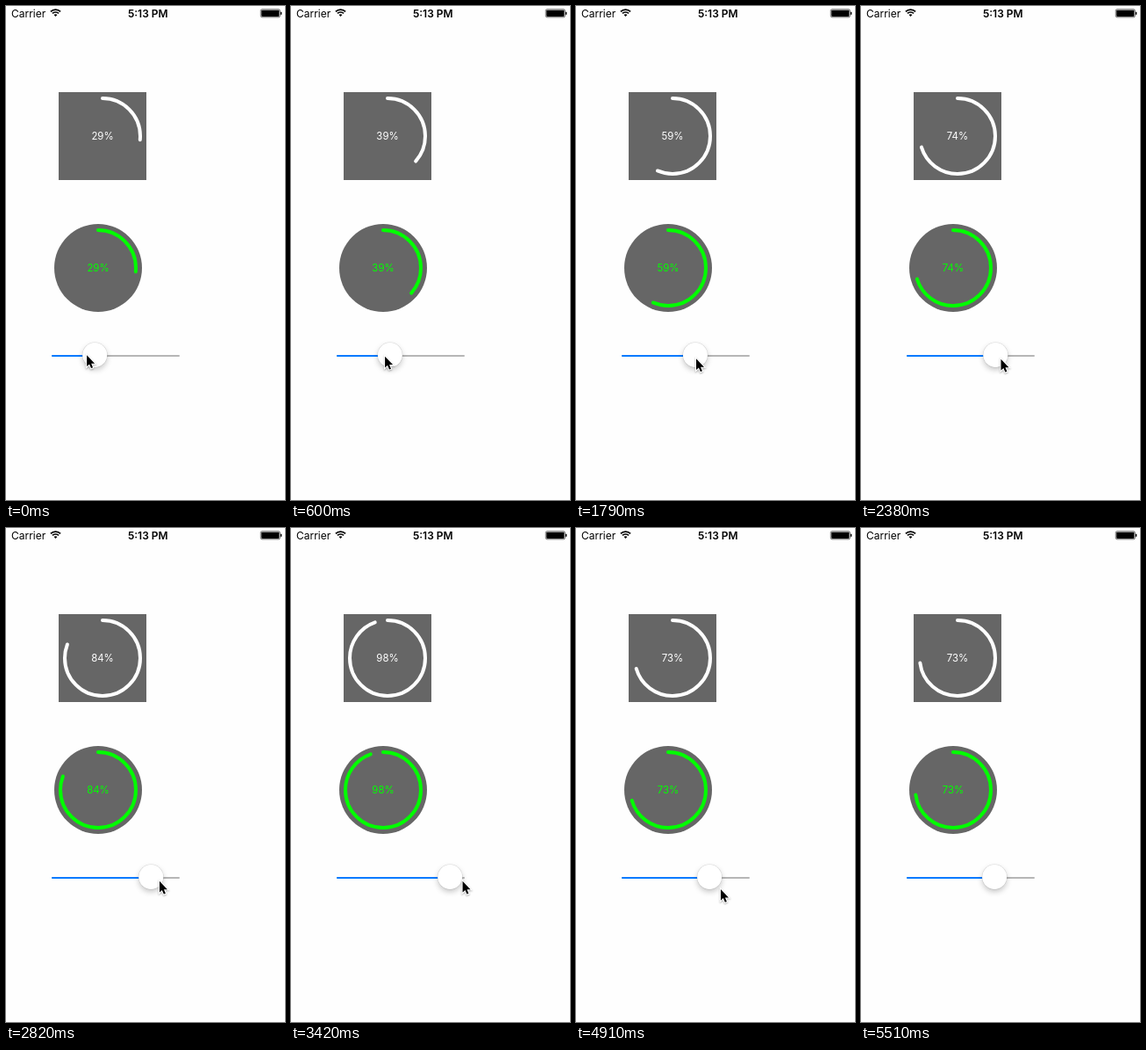
Write an HTML page with a canvas that moves like this. It is 318x562 px and loops after 5830 ms.

```html
<!DOCTYPE html>
<html lang="en">
<head>
<meta charset="utf-8">
<title>Progress rings</title>
<style>
html, body { margin: 0; width: 100%; height: 100%; overflow: hidden; background: #fefefe; }
canvas { display: block; width: 318px; height: 562px; }
</style>
</head>
<body>
<canvas id="stage"></canvas>
<script>
const W = 318, H = 562, LOOP = 5830, STEP = 148.2, LAST_STEP = 37;
const TOP = -Math.PI / 2;
const canvas = document.getElementById('stage');
const ctx = canvas.getContext('2d');
const ratio = window.devicePixelRatio || 1;
canvas.width = W * ratio;
canvas.height = H * ratio;
ctx.scale(ratio, ratio);

// Turning points of the drag: [step, percent].
const drag = [[-1, 26.6], [12, 59], [16, 74], [24, 101.5], [26, 100], [29, 77], [31, 68], [33, 73]];

function percentAt(step) {
  const next = drag.findIndex(([at]) => at >= step);
  if (next < 0) return drag[drag.length - 1][1];
  if (next === 0) return drag[0][1];
  const [t0, p0] = drag[next - 1], [t1, p1] = drag[next];
  return Math.min(100, p0 + (p1 - p0) * (step - t0) / (t1 - t0));
}

// The pointer runs a little faster than the knob, then flicks off the stage.
function pointerAt(step, percent) {
  const flick = Math.max(0, step - 31) ** 3;
  return [
    91 + 1.5 * (percent - 29) + 0.87 * flick,
    396 + Math.min(4.5, step / 3) + 1.15 * flick
  ];
}

function disc(x, y, r, color) {
  ctx.fillStyle = color;
  ctx.beginPath();
  ctx.arc(x, y, r, 0, Math.PI * 2);
  ctx.fill();
}

function arc(x, y, r, from, to, width, color, cap) {
  ctx.strokeStyle = color;
  ctx.lineWidth = width;
  ctx.lineCap = cap;
  ctx.beginPath();
  ctx.arc(x, y, r, from, to);
  ctx.stroke();
}

function line(x1, x2, y, color) {
  ctx.strokeStyle = color;
  ctx.lineWidth = 2;
  ctx.lineCap = 'round';
  ctx.beginPath();
  ctx.moveTo(x1, y);
  ctx.lineTo(x2, y);
  ctx.stroke();
}

function text(str, x, y, color, align, size = 12, weight = 400) {
  ctx.font = `${weight} ${size}px Inter, Roboto, sans-serif`;
  ctx.textAlign = align;
  ctx.fillStyle = color;
  ctx.fillText(str, x, y);
}

function statusBar() {
  text('Carrier', 6, 12.5, '#000', 'left');
  text('5:13 PM', 161.8, 12.5, '#000', 'center', 12, 600);

  const spread = Math.PI / 4;
  for (const [r, width] of [[1.4, 2.8], [5, 1.7], [7.9, 1.7]]) {
    arc(56.5, 12, r, TOP - spread, TOP + spread, width, '#000', 'butt');
  }

  ctx.fillStyle = '#000';
  ctx.lineWidth = 0.6;
  ctx.beginPath();
  ctx.roundRect(290.3, 3.8, 22, 9, 1.6);
  ctx.stroke();
  ctx.beginPath();
  ctx.roundRect(291.2, 4.7, 20.2, 7.2, 0.8);
  ctx.fill();
  ctx.fillRect(313, 6.8, 1.3, 3);
}

function ring(x, y, color, arcPercent, label) {
  arc(x, y, 43, TOP, TOP + Math.PI * 2 * arcPercent / 100, 4, color, 'round');
  text(label, x, y + 4.2, color, 'center', 11.4);
}

function slider(percent) {
  const x = 67.5 + 1.16 * percent, y = 397;
  line(53, 197, 398, '#b6b6b6');
  line(53, x, 398, '#007aff');
  ctx.save();
  ctx.shadowColor = 'rgba(0,0,0,.22)';
  ctx.shadowBlur = 6 * ratio;
  ctx.shadowOffsetY = 3 * ratio;
  disc(x, y, 14, '#fff');
  ctx.restore();
  disc(x, y, 14.4, 'rgba(0,0,0,.13)');
  disc(x, y, 13.9, '#fff');
}

function pointer(x, y) {
  const shape = new Path2D('M0 0V12.8L2.9 10.1L4.9 14.8L6.9 14L5 9.4H9Z');
  ctx.save();
  ctx.translate(x + 1, y + 1.3);
  ctx.miterLimit = 3;
  ctx.lineWidth = 2.2;
  ctx.strokeStyle = '#fff';
  ctx.shadowColor = 'rgba(0,0,0,.3)';
  ctx.shadowBlur = 2 * ratio;
  ctx.shadowOffsetY = ratio;
  ctx.stroke(shape);
  ctx.shadowColor = 'transparent';
  ctx.fillStyle = '#000';
  ctx.fill(shape);
  ctx.restore();
}

function draw(ms) {
  const step = Math.min(LAST_STEP, Math.floor(ms / STEP));
  const percent = percentAt(step);
  const arcPercent = percentAt(step - 1); // arcs trail the slider
  const label = Math.round(percent) + '%';

  ctx.fillStyle = '#fefefe';
  ctx.fillRect(0, 0, W, H);
  statusBar();

  ctx.fillStyle = '#666';
  ctx.fillRect(60, 98, 100, 100);
  ring(110, 148, '#fff', arcPercent, label);
  disc(105, 298, 50, '#666');
  ring(105, 298, '#0f0', arcPercent, label);

  slider(percent);
  pointer(...pointerAt(step, percent));
}

const begin = performance.now();
function tick() {
  draw((performance.now() - begin) % LOOP);
  requestAnimationFrame(tick);
}
tick();
</script>
</body>
</html>
```
